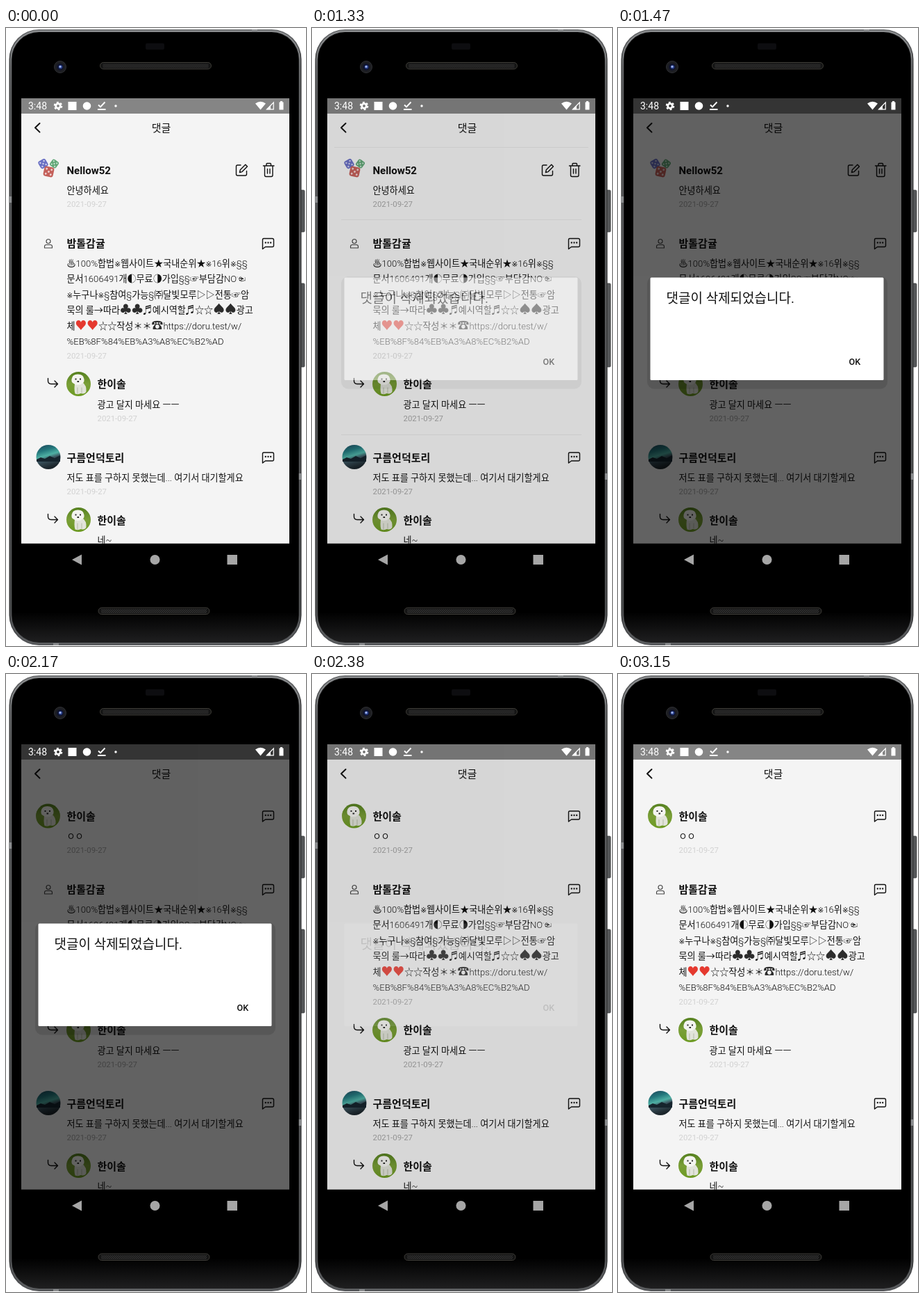
Write an HTML page that moves like this. It is 432 by 888 pixels and loops after 3570 ms.

```html
<!DOCTYPE html>
<html lang="ko">
<head>
<meta charset="utf-8">
<title>댓글</title>
<style>
html, body { margin: 0; width: 100%; height: 100%; overflow: hidden; background: #fff; }
svg.stage { display: block; width: 100vw; height: 100vh; }
text { font: 350 13.1px Roboto, "Noto Sans CJK KR", "Noto Sans CJK", sans-serif; fill: #111; white-space: pre; }
.name { font-size: 15px; font-weight: 700; }
.title { font-size: 15px; }
.clock { font-size: 14px; font-weight: 400; fill: #fff; }
.small { font: 10.5px "DejaVu Sans", sans-serif; }
.big { font-size: 16.8px; fill: #2c2c2c; }
.red { fill: #e5392f; }
.head { font-size: 19px; font-weight: 400; }
.ok { font-size: 12.6px; font-weight: 500; }
.line { fill: none; stroke: #111; stroke-width: 1.4; stroke-linecap: round; stroke-linejoin: round; }
.thick { stroke-width: 2; }
.thin { stroke: #444; stroke-width: 1.1; }

/* The loop has 51 ticks of 70 ms; every change lands on a tick. */
.before, .after, .trash, .dim, .dialog, .shade, .date, .rule {
  animation: 3570ms step-end infinite;
}
.before { animation-name: before; }
.after { animation-name: after; }
.trash { animation-name: press; }
.dim { animation-name: dim; }
.dialog { animation-name: dialog; }
.shade { animation-name: shade; }
.date { font-size: 11.4px; font-weight: 400; animation-name: date; }
.rule { stroke: #e6e6e6; animation-name: rule; }

@keyframes before { 0% { visibility: visible; } 54.9%, 100% { visibility: hidden; } }
@keyframes after { 0% { visibility: hidden; } 54.9%, 100% { visibility: visible; } }
@keyframes press {
  0% { opacity: 1; }
  17.645% { opacity: .6; }
  19.605% { opacity: .25; }
  21.565% { opacity: .6; }
  23.525%, 100% { opacity: 1; }
}
@keyframes dim {
  0% { opacity: 0; }
  35.29% { opacity: .02; }
  37.25% { opacity: .115; }
  39.21% { opacity: .4; }
  41.17% { opacity: .6; }
  62.74% { opacity: .55; }
  64.7% { opacity: .4; }
  66.66% { opacity: .12; }
  68.62%, 100% { opacity: 0; }
}
@keyframes dialog {
  0% { opacity: 0; }
  35.29% { opacity: .15; }
  37.25% { opacity: .48; }
  39.21% { opacity: .85; }
  41.17% { opacity: 1; }
  62.74% { opacity: .8; }
  64.7% { opacity: .43; }
  66.66% { opacity: .12; }
  68.62%, 100% { opacity: 0; }
}
@keyframes shade { 0% { opacity: .11; } 64.7%, 100% { opacity: 0; } }
@keyframes date {
  0% { fill: #d2d2d2; }
  35.29% { fill: #a6a6a6; }
  68.62%, 100% { fill: #d2d2d2; }
}
@keyframes rule { 0% { opacity: 0; } 35.29% { opacity: 1; } 39.21%, 100% { opacity: 0; } }
</style>
</head>
<body>
<svg class="stage" viewBox="0 0 432 888" preserveAspectRatio="none">
<defs>
  <linearGradient id="metal" x2="0" y2="1">
    <stop offset="0" stop-color="#6c6e70"/>
    <stop offset=".06" stop-color="#3a3b3c"/>
    <stop offset=".94" stop-color="#333435"/>
    <stop offset="1" stop-color="#55575a"/>
  </linearGradient>
  <linearGradient id="edge" x2="0" y2="1">
    <stop offset="0" stop-color="#a2a4a6"/>
    <stop offset=".1" stop-color="#7a7c7e"/>
    <stop offset="1" stop-color="#606264"/>
  </linearGradient>
  <linearGradient id="glass" x2="0" y2="1">
    <stop offset=".95"/>
    <stop offset="1" stop-color="#1f1f20"/>
  </linearGradient>
  <linearGradient id="sky" x2=".3" y2="1">
    <stop offset="0" stop-color="#1d4257"/>
    <stop offset=".3" stop-color="#23777c"/>
    <stop offset=".52" stop-color="#4fb0a4"/>
    <stop offset=".66" stop-color="#3c5560"/>
    <stop offset="1" stop-color="#1c262c"/>
  </linearGradient>
  <linearGradient id="grass" x2="0" y2="1">
    <stop offset="0" stop-color="#55801f"/>
    <stop offset=".5" stop-color="#7a9f37"/>
    <stop offset="1" stop-color="#6c9a22"/>
  </linearGradient>
  <pattern id="mesh" width="3" height="3" patternUnits="userSpaceOnUse">
    <path d="M0 0h1.5v1.5h-1.5zM1.5 1.5h1.5v1.5h-1.5z" fill="#353535"/>
  </pattern>
  <clipPath id="screen"><path d="M22 101h386v639.700h-386z"/></clipPath>

  <g id="speaker">
    <rect width="160" height="9.5" rx="4.7" fill="#151515" stroke="#3f3d38"/>
    <rect x="4" y="2" width="152" height="6" fill="url(#mesh)"/>
  </g>
  <g id="dog">
    <circle r="17.5" fill="url(#grass)"/>
    <path d="M-5-3Q-7 8-5 14Q0 15.500 3 13.500Q9 15 11 11Q12 2 5-3z" fill="#e2e4da"/>
    <path d="M-10-7Q-9-14-1-14Q7-14 8-7Q8.500-2 5.500-1Q3 1.500-1 1.500Q-5 1.500-7.500-1Q-10.500-2-10-7z" fill="#f4f4f0"/>
    <path d="M-5-8h2v2h-2zM1.500-8h2v2h-2zM-2-4.500h2.600v2h-2.600z" fill="#2b2b2b"/>
    <path d="M-1.500 5v9M4.500 5v8" stroke="#b5bba6"/>
  </g>
  <g id="die">
    <rect x="-6" y="-6" width="12" height="12" rx="3"/>
    <g fill="#fff" opacity=".7">
      <circle cx="-3" cy="-3" r="1.200"/><circle cx="3" cy="-3" r="1.200"/>
      <circle r="1.200"/>
      <circle cx="-3" cy="3" r="1.200"/><circle cx="3" cy="3" r="1.200"/>
    </g>
  </g>
  <g id="bubble">
    <path class="line" d="M2-7.500H14.500Q16.500-7.500 16.500-5.500V2.500Q16.500 4.500 14.500 4.500H4.500L.5 7.500V-5.500Q.5-7.500 2-7.500z"/>
    <g fill="#111">
      <circle cx="4.800" cy="-1.500" r="1.150"/><circle cx="8.500" cy="-1.500" r="1.150"/><circle cx="12.200" cy="-1.500" r="1.150"/>
    </g>
  </g>
  <path id="reply" class="line" d="M0 0V3.500Q0 8 4.500 8H14M9.500 3.500L14 8L9.500 12.500"/>
</defs>

<!-- Phone -->
<g fill="#56585a" stroke="#303132" stroke-width=".7">
  <rect x="423" y="233" width="7" height="60" rx="1.500"/>
  <rect x="423" y="367" width="7" height="120" rx="1.500"/>
</g>
<rect x="4.500" y="2" width="421" height="885" rx="43" fill="url(#metal)"/>
<rect x="7" y="4.500" width="416" height="880" rx="40.500" fill="none" stroke="url(#edge)" stroke-width="1.200"/>
<path d="M4.500 242h4v9h-4zM421.500 640h4v9h-4zM354 2h8v3h-8zM68 884h8v3h-8z" fill="#8b8d8f"/>
<rect x="8.500" y="6" width="413" height="877" rx="39" fill="url(#glass)"/>
<rect x="201" y="22" width="27" height="9" rx="2" fill="#0d0d10"/>
<use href="#speaker" x="135.500" y="49.500"/>
<use href="#speaker" x="133" y="833"/>
<circle cx="78" cy="56" r="8.500" fill="#1d1e22" stroke="#2f3034"/>
<circle cx="78" cy="56" r="5" fill="#10142c"/>
<circle cx="78.500" cy="56" r="2.800" fill="#29408c"/>
<circle cx="78" cy="55.500" r="1.500" fill="#a9bcf0"/>

<g clip-path="url(#screen)">
  <path d="M22 101h386v640h-386z" fill="#f4f4f4"/>
  <path d="M22 101h386v22h-386z" fill="#858585"/>
  <path class="line thick" d="M48.500 137L42 143.300L48.500 149.600"/>
  <text class="title" x="223.500" y="149" text-anchor="middle">댓글</text>
  <path class="rule" d="M32 171.500h366M42 275.500h346M42 584.500h346"/>

  <!-- First comment, before the refresh -->
  <g class="before">
    <use href="#die" transform="translate(53.500 195) rotate(-30)" fill="#6a70c4"/>
    <use href="#die" transform="translate(69.500 195) rotate(35) scale(.9)" fill="#62a878"/>
    <use href="#die" transform="translate(61.500 206.500) rotate(12) scale(1.200)" fill="#c4605a"/>
    <text class="name" x="87.500" y="210">Nellow52</text>
    <text x="87.500" y="237.500">안녕하세요</text>
    <path class="line" d="M338 197H333.500Q331.500 197 331.500 199V210Q331.500 212 333.500 212H344.500Q346.500 212 346.500 210V205.500M336.500 207.500L337.300 203.800L344.800 196.200L347.500 198.900L340 206.600z"/>
    <path class="line trash" d="M370.500 198H386M375 198V195.500Q375 194.500 376 194.500H380.500Q381.500 194.500 381.500 195.500V198M372.500 198V211.500Q372.500 213.500 374.500 213.500H382Q384 213.500 384 211.500V198M376.500 202.500V209M380 202.500V209"/>
  </g>
  <!-- First comment, after the refresh -->
  <g class="after">
    <use href="#dog" x="60.500" y="204"/>
    <text class="name" x="87.500" y="209.500">한이솔</text>
    <text x="87.500" y="237.500">ㅇㅇ</text>
    <use href="#bubble" x="369" y="204.500"/>
  </g>
  <text class="date" x="87.500" y="257">2021-09-27</text>

  <path class="line thin" d="M58 306.500a3 3 0 1 0 6 0a3 3 0 1 0-6 0M55.500 316V314Q55.500 311.500 58 311.500H64Q66.500 311.500 66.500 314V316z"/>
  <text class="name" x="87.500" y="315">밤톨감귤</text>
  <use href="#bubble" x="369" y="310"/>
  <text x="87.500" y="343">♨100%합법<tspan class="small">※</tspan>웹사이트★국내순위★<tspan class="small">※</tspan>16위<tspan class="small">※</tspan>§§</text>
  <text x="87.500" y="365.400">문서1606491개◐무료◑가입§§☞부담감NO☜</text>
  <text x="87.500" y="387.900"><tspan class="small">※</tspan>누구나<tspan class="small">※</tspan>§참여§가능§㈜달빛모루▷▷전통☞암</text>
  <text x="87.500" y="410.400">묵의 룰→따라<tspan class="big">♣♣</tspan>♬예시역할♬☆☆<tspan class="big">♠♠</tspan>광고</text>
  <text x="87.500" y="432.900">체<tspan class="big red">♥♥</tspan>☆☆작성＊＊<tspan class="big">☎</tspan>https://doru.test/w/</text>
  <text x="87.500" y="455.400">%EB%8F%84%EB%A3%A8%EC%B2%AD</text>
  <text class="date" x="87.500" y="475">2021-09-27</text>

  <use href="#reply" x="60.500" y="503.500"/>
  <use href="#dog" x="104.500" y="511.500"/>
  <text class="name" x="131.500" y="517">한이솔</text>
  <text x="131.500" y="545.500">광고 달지 마세요 ㅡㅡ</text>
  <text class="date" x="131.500" y="565">2021-09-27</text>

  <circle cx="61" cy="616.500" r="17.500" fill="url(#sky)"/>
  <path d="M44 620L50 617L56 619L63 615L70 618L78 614V623H44z" fill="#16242d"/>
  <text class="name" x="87.500" y="622.500">구름언덕토리</text>
  <use href="#bubble" x="369" y="617.500"/>
  <text x="87.500" y="651">저도 표를 구하지 못했는데... 여기서 대기할게요</text>
  <text class="date" x="87.500" y="670">2021-09-27</text>

  <use href="#reply" x="60.500" y="698.500"/>
  <use href="#dog" x="104.500" y="706.500"/>
  <text class="name" x="131.500" y="712.500">한이솔</text>
  <text x="131.500" y="741">네~</text>

  <path class="dim" d="M22 101h386v640h-386z"/>

  <!-- Status bar -->
  <text class="clock" x="32" y="117">3:48</text>
  <g fill="#fff">
    <circle cx="75" cy="112" r="3.300" fill="none" stroke="#fff" stroke-width="2.800"/>
    <circle cx="75" cy="112" r="5.300" fill="none" stroke="#fff" stroke-width="2" stroke-dasharray="2.800 2.750"/>
    <rect x="89.500" y="106" width="12" height="12"/>
    <circle cx="116.500" cy="112" r="5.800"/>
    <path d="M133 110.500L136 113.500L142.500 106.500M132 117H143.500" fill="none" stroke="#fff" stroke-width="1.900"/>
    <circle cx="158" cy="112" r="1.700"/>
    <path d="M359 108.500Q366.500 103 374 108.500L366.500 117.500z"/>
    <path d="M375.500 116.800H385.300V107z" fill="none" stroke="#fff" stroke-width="1.200"/>
    <path d="M375 117.300H381V111.300z"/>
    <path d="M395 105h3v1.500h1.500v11h-6v-11h1.500z"/>
  </g>
</g>

<!-- Dialog -->
<g class="dialog">
  <rect class="shade" x="42" y="357" width="346" height="161.500" rx="10"/>
  <rect x="46.500" y="358.500" width="336" height="147.500" rx="1.500" fill="#fff"/>
  <text class="head" x="69.500" y="394.500">댓글이 삭제되었습니다.</text>
  <text class="ok" x="332.500" y="484.300">OK</text>
</g>

<!-- Navigation -->
<g fill="#a6a6a6">
  <path d="M95 764L109 756.500V771.500z"/>
  <circle cx="214.500" cy="764" r="7"/>
  <rect x="318.500" y="757" width="14.500" height="14"/>
</g>
</svg>
</body>
</html>
```
